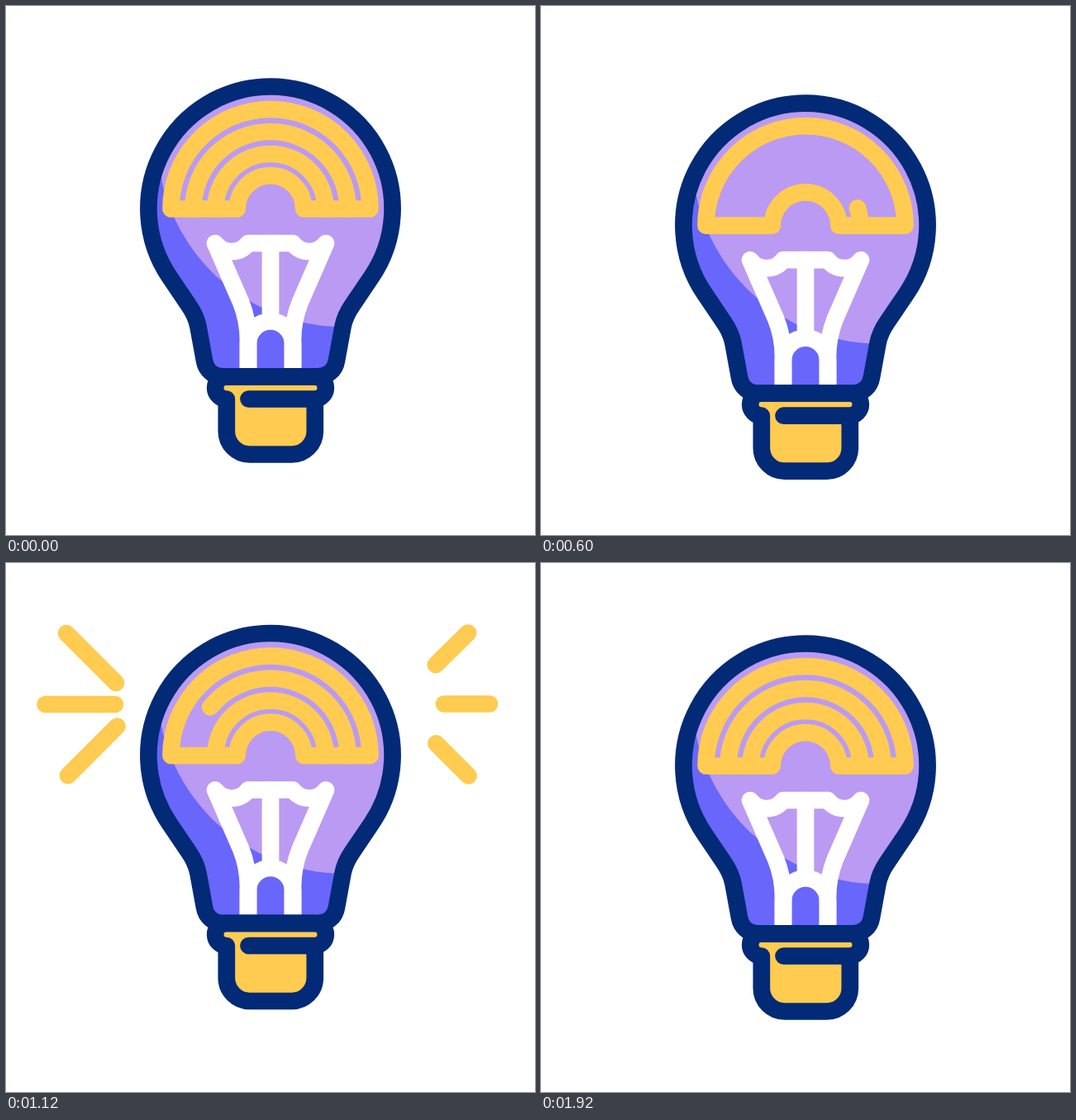
An HTML page that plays this animation: 640x640 px, repeating every 2000 ms.

```html
<!DOCTYPE html>
<html lang="en">
<head>
<meta charset="utf-8">
<title>Light bulb</title>
<style>
  html, body { margin: 0; width: 100%; height: 100%; overflow: hidden; background: #fff; }
  svg { display: block; width: 100%; height: 100%; }
  .line { fill: none; stroke-width: 20.7; stroke-linecap: round; stroke-linejoin: round; }
  .navy { stroke: #032a76; }
  .gold { stroke: #ffcb50; }
  .white { stroke: #fff; }
</style>
</head>
<body>
<svg viewBox="0 0 640 640">
  <defs>
    <path id="glass" d="M320 97.5A147.5 147.5 0 0 0 198 328L221 362Q230 375 232.5 388L240 429C242 441 251 448.3 263 448.3H377C389 448.3 398 441 400 429L407.5 388Q410 375 419 362L442 328A147.5 147.5 0 0 0 320 97.5Z"/>
    <clipPath id="inside"><use href="#glass"/></clipPath>
  </defs>
  <g id="bulb">
    <g clip-path="url(#inside)">
      <use href="#glass" fill="#6966fb"/>
      <circle cx="409.5" cy="161.6" r="226.7" fill="#ba9af3"/>
    </g>
    <g class="line gold">
      <path d="M199.5 245.5A120.5 120.5 0 0 1 440.5 245.5H360.3A40.3 40.3 0 0 0 279.7 245.5Z"/>
      <path id="outer" pathLength="1" d="M226.5 245.5A93.5 93.5 0 0 1 413.5 245.5"/>
      <path id="inner" pathLength="1" d="M253.5 245.5A66.5 66.5 0 0 1 386.5 245.5"/>
    </g>
    <g class="line white">
      <path d="M293 440V405Q293 380 284 358L253 287A25 25 0 0 0 293 287H347A25 25 0 0 0 387 287L356 358Q347 380 347 405V440"/>
      <path d="M320 287V381M293 440V408.5A27 27 0 0 1 347 408.5V440"/>
    </g>
    <path fill="#ffcb50" d="M253 448H387V475.5H374V514.5A28 28 0 0 1 346 542.5H294A28 28 0 0 1 266 514.5V475.5H253Z"/>
    <g class="line navy">
      <use href="#glass"/>
      <path d="M293.5 475.5H373.2A13.6 13.6 0 0 0 373.2 448.3H266.8A13.6 13.6 0 0 0 266.8 475.5V514.5A28 28 0 0 0 294.8 542.5H345.8A28 28 0 0 0 373.8 514.5V475.5"/>
    </g>
  </g>
  <g id="left" class="line gold">
    <path pathLength="1" d="M133 145L73 85"/>
    <path pathLength="1" d="M132 171H47.5"/>
    <path pathLength="1" d="M134.5 197.5L75 257"/>
  </g>
  <g id="right" class="line gold">
    <path pathLength="1" d="M498.5 144L559 84.5"/>
    <path pathLength="1" d="M500 170.5H585"/>
    <path pathLength="1" d="M499 197L559.5 257.5"/>
  </g>
</svg>
<script>
const LOOP = 2000, STEP = 40;
const el = id => document.getElementById(id);

// Eased progress of t from a to b.
function ease(t, a, b) {
  const x = Math.min(1, Math.max(0, (t - a) / (b - a)));
  return x * x * (3 - 2 * x);
}

// Show only the part of a path between two fractions of its length.
function trim(path, from, to) {
  const len = to - from;
  path.style.display = len > 0.0001 ? '' : 'none';
  path.setAttribute('stroke-dasharray', `${len} 2`);
  path.setAttribute('stroke-dashoffset', -from);
}

function height(t) {
  return 39 * ease(t, 200, 480) - 103 * ease(t, 480, 920)
    + 103 * ease(t, 920, 1320) - 39 * ease(t, 1320, 1680);
}

// The arc wipes away from the left, then grows back, twice per loop.
function arc(path, t) {
  if (t < 600) trim(path, ease(t, 200, 600), 1);
  else if (t < 1000) trim(path, 0, ease(t, 640, 1000));
  else if (t < 1400) trim(path, ease(t, 1000, 1400), 1);
  else trim(path, 0, ease(t, 1440, 1840));
}

function rays(id, t, start) {
  const head = ease(t, start, start + 200);
  const tail = ease(t, start + 200, start + 400);
  for (const ray of el(id).children) trim(ray, tail, head);
}

function draw(t) {
  el('bulb').setAttribute('transform', `translate(0 ${height(t)})`);
  arc(el('outer'), t);
  arc(el('inner'), t - 80);
  rays('right', t, 840);
  rays('left', t, 920);
}

function tick() {
  const t = performance.now() % LOOP;
  draw(Math.floor(t / STEP) * STEP);
  requestAnimationFrame(tick);
}
tick();
</script>
</body>
</html>
```
